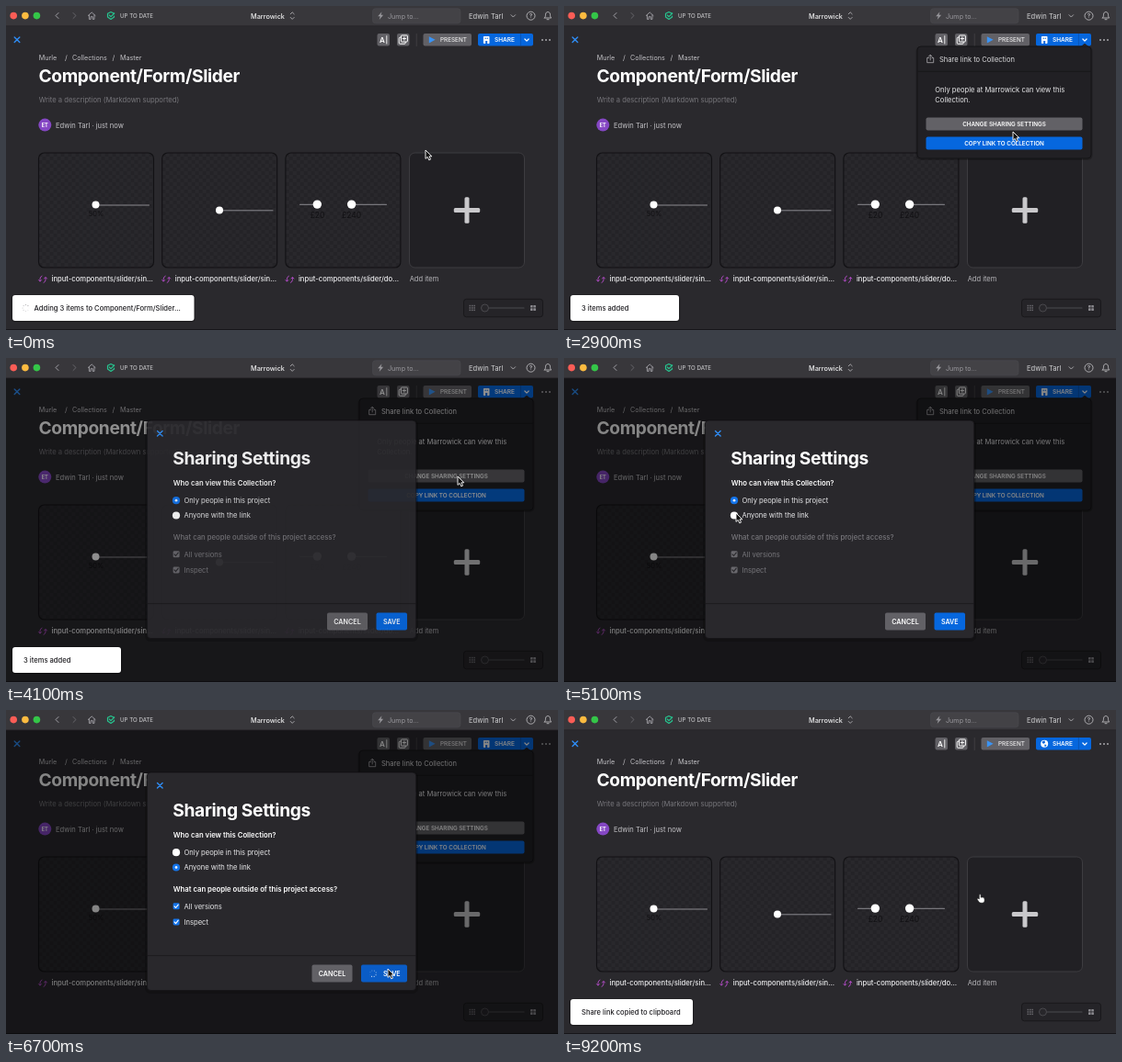
An HTML page for the animation above (9.3 s loop, 600 px wide and 353 px high).

```html
<!DOCTYPE html>
<html lang="en">
<head>
<meta charset="utf-8">
<title>Sharing a collection</title>
<style>
html, body { margin: 0; width: 100%; height: 100%; overflow: hidden; background: #2a292d; }
svg { display: block; width: 100vw; height: 100vh; }
text { font-family: Inter, Roboto, "Liberation Sans", sans-serif; white-space: pre; }
</style>
</head>
<body>
<svg id="stage" viewBox="0 0 600 353" xmlns="http://www.w3.org/2000/svg"></svg>
<script>
const LOOP = 9300;
const BLUE = '#0667de', PRESSED = '#0458cc', CONTROL = '#1474ea';
const GREY = '#626166', PALE = '#e8e8ea', PAGE = '#2a292d';
const user = 'Edwin Tarl', team = 'Marrowick', project = 'Murle';

// Drawing helpers; text is placed by the middle of its capitals.
const text = (x, y, s, size = 7.6, fill = PALE, weight = 400, extra = '') =>
  `<text x="${x}" y="${y + size * .36}" font-size="${size}" fill="${fill}" font-weight="${weight}" ${extra}>${s}</text>`;
const mid = (x, y, s, size, fill, weight) => text(x, y, s, size, fill, weight, 'text-anchor="middle"');
const rect = (x, y, w, h, fill, r = 2, extra = '') =>
  `<rect x="${x}" y="${y}" width="${w}" height="${h}" rx="${r}" fill="${fill}" ${extra}/>`;
const dot = (x, y, r, fill, extra = '') => `<circle cx="${x}" cy="${y}" r="${r}" fill="${fill}" ${extra}/>`;
const line = (d, stroke = PALE, w = 1) =>
  `<path d="${d}" fill="none" stroke="${stroke}" stroke-width="${w}" stroke-linecap="round" stroke-linejoin="round"/>`;
const shape = (d, fill) => `<path d="${d}" fill="${fill}"/>`;
const group = (id, body) => `<g id="${id}">${body}</g>`;
const move = (x, y, body) => `<g transform="translate(${x} ${y})">${body}</g>`;
const cross = (x, y) => line(`M${x - 2.8} ${y - 2.8}l5.6 5.6m0 -5.6l-5.6 5.6`, '#2f8df5', 1.4);
const tick = (x, y, color, w = 1) => line(`M${x - 2} ${y}l1.5 1.7l2.7 -3.4`, color, w);
const button = (x, y, w, h, fill, s, size = 6.3) =>
  rect(x, y, w, h, fill) + mid(x + w / 2, y + h / 2, s, size, '#fff', 600);

function titleBar() {
  return rect(0, 0, 600, 22, '#38373b', 0) + rect(0, 21.5, 600, .7, '#201f23', 0) +
    dot(8.2, 10.6, 3.8, '#fb5d56') + dot(20.9, 10.6, 3.8, '#fcbb40') + dot(33.4, 10.6, 3.8, '#34c648') +
    line('M57 7.5l-3 3l3 3', '#a3a2a7') + line('M73 7.5l3 3l-3 3', '#66656a') +
    line('M89.3 10.5l3.9 -3.6l3.9 3.6M90.4 9.8v4.6h1.7v-2.7h2.2v2.7h1.7v-4.6', '#a3a2a7', .9) +
    line('M117.5 8.2l-3.5 -1.7l-3.5 1.7v3.8l3.5 2.5l3.5 -2.5v-1', '#27c48f', 1.2) +
    line('M112.3 10l1.7 1.6l3.7 -3.6', '#27c48f', 1.2) +
    text(124, 10.9, 'UP TO DATE', 6.15, '#d8d8da') +
    mid(284.5, 11, team, 7.3, '#ededee', 500) +
    line('M309.2 8.8l2 -2l2 2M309.2 12.4l2 2l2 -2', '#b0afb3', .9) +
    rect(398.5, 2.8, 95.5, 16, '#434246', 3, 'stroke="#4b4a4f" stroke-width=".6"') +
    shape('M408.5 6.2l-4.3 5h2.5l-1 3.8l4.4 -5.2h-2.6z', '#98979c') +
    text(415, 11, 'Jump to...', 7.2, '#98979c') +
    text(503, 11, user, 7.6, '#d0d0d2') + line('M549 9.7l2.3 2.3l2.3 -2.3', '#b0afb3', .9) +
    dot(570.5, 10.7, 4.5, 'none', 'stroke="#b9b8bc" stroke-width=".9"') + mid(570.5, 10.8, '?', 6.4, '#c9c8cc', 500) +
    line('M585.3 13h7.4c-1.3 -1.2 -1.1 -2.4 -1.2 -3.8c-.2 -3.6 -4.8 -3.6 -5 0c-.1 1.4 .1 2.6 -1.2 3.8M588 14.7h2', '#b9b8bc', .9);
}

function toolBar() {
  return cross(12, 36.8) +
    rect(403.5, 30, 13.5, 13.5, GREY) + mid(408.8, 36.8, 'A', 8, '#fff', 600) + line('M413.8 32.6v8.4', '#fff', .9) +
    rect(425, 30, 13.5, 13.5, GREY) +
    rect(427.2, 34.2, 7, 7, 'none', 1, 'stroke="#fff"') + rect(429.4, 32, 7, 7, GREY, 1, 'stroke="#fff"') +
    line('M432.9 33.8v3.4M431.2 35.5h3.4', '#fff', .9) +
    rect(445.8, 30, .7, 14, '#48474b', 0) +
    rect(453.5, 30, 52.5, 13.5, GREY) + shape('M459.8 33.2l6.8 3.6l-6.8 3.6z', '#3a93f4') +
    text(472, 36.9, 'PRESENT', 6.35, '#eee', 500) +
    rect(513, 30, 60, 13.5, BLUE) + group('dropHot', rect(559.5, 30, 13.5, 13.5, '#084cab')) +
    rect(558.9, 30, .7, 13.5, '#0a4da6', 0) +
    text(531, 36.9, 'SHARE', 6.5, '#fff', 600) + line('M563.9 36l2.1 2.1l2.1 -2.1', '#fff', 1.2) +
    group('iconTeam', rect(518.9, 33, 6.6, 8, '#fff', .8) + rect(520.6, 34.6, 1.1, 1.3, BLUE, 0) +
      rect(522.7, 34.6, 1.1, 1.3, BLUE, 0) + rect(521.2, 38, 2, 3, BLUE, 0)) +
    group('iconGlobe', dot(522.2, 36.8, 4, '#fff') + shape('M520 34l2.6 -.4l.4 2l-1.6 1.2l-1.6 -.9zM522.4 37.6l2.2 .3l-1.3 2.1l-1 -.6z', BLUE)) +
    [583, 587, 591].map(x => dot(x, 36.9, 1, '#a8a7ab')).join('');
}

// Two upright arrows chasing each other
const sync = line('M-1 -3.6a3.4 3.4 0 0 0 -2 3v2.6M-4.5 .8l1.5 1.5l1.5 -1.5' +
  'M1 3.6a3.4 3.4 0 0 0 2 -3v-2.6M4.5 -.8l-1.5 -1.5l-1.5 1.5', '#b44cc8', .95);

function cards() {
  const labels = ['input-components/slider/sin...', 'input-components/slider/sin...', 'input-components/slider/do...'];
  const frames = labels.map((s, i) => move(35.5 + i * 134.2, 160,
    rect(0, 0, 125, 125, 'url(#checks)', 6, 'stroke="#121114" stroke-width="1.1"') +
    move(4.5, 137.8, sync) + text(14, 137.5, s, 7.65, '#ececee', 500))).join('');
  const rail = '#98979c', ink = '#111013';
  return frames +
    line('M97.5 217H155.5', rail, .9) + dot(97.5, 216.6, 4, '#fff') + mid(98, 226.5, '50%', 7.4, ink) +
    line('M232 222.8H290', rail, .9) + dot(232, 222.6, 4, '#fff') +
    line('M319.5 216.3H338M375.5 216.3H413.5', rail, .9) + dot(338.3, 216.1, 4.7, '#fff') + dot(375.6, 216.1, 4.7, '#fff') +
    mid(338.5, 227.5, '£20', 8.5, ink) + mid(375.6, 227.5, '£240', 8.5, ink) +
    rect(438.5, 160, 125, 125, '#212024', 6, 'stroke="#3d3c40"') +
    rect(498.5, 208.3, 5, 28.4, '#c9c8cb', 1.5) + rect(486.8, 220, 28.4, 5, '#c9c8cb', 1.5) +
    text(438.7, 297.5, 'Add item', 7.5, '#b9b8bc');
}

function zoomBar() {
  let s = rect(497.5, 319.3, 86, 19.5, '#252428', 3, 'stroke="#19181b"');
  for (let i = 0; i < 9; i++) s += rect(503.6 + i % 3 * 2.4, 325.8 + (i / 3 | 0) * 2.4, 1.5, 1.5, '#6b6a6f', 0);
  for (let i = 0; i < 4; i++) s += rect(570 + i % 2 * 3.3, 326 + (i >> 1) * 3.3, 2.6, 2.6, '#8b8a8f', .4);
  return s + line('M525.5 329H563', '#4b4a4f', 1.2) + dot(520.5, 329, 4, '#28272b', 'stroke="#4b4a4f"');
}

function page() {
  const crumb = '#c3c2c6';
  return rect(0, 0, 600, 353, PAGE, 0) + toolBar() +
    text(35.8, 56, project, 7.2, crumb) + text(64, 56, '/', 7.6, crumb) + text(72, 56, 'Collections', 7.2, crumb) +
    text(115.5, 56, '/', 7.6, crumb) + text(124, 56, 'Master', 7.2, crumb) +
    text(35.5, 75.9, 'Component/Form/Slider', 19.2, '#fff', 700, 'letter-spacing="-.4"') +
    text(35.8, 102.4, 'Write a description (Markdown supported)', 7.62, '#77767b') +
    dot(42.3, 129.6, 7, '#8547c4') + mid(42.3, 129.7, 'ET', 5.6, '#fff', 700) +
    text(54, 130, user + ' · just now', 7.6, '#c3c2c6') +
    cards() + zoomBar() + rect(0, 352, 600, 1, '#17161a', 0);
}

function popupFrame(h, gy, body) {
  return rect(382.5, 44, 192, h + 2, '#000', 5, 'opacity=".22"') +
    rect(384, 44, 189, h, '#212024', 4, 'stroke="#131216" stroke-width=".9"') +
    shape('M561.5 44.3l4.5 -3.6l4.5 3.6z', '#212024') + rect(384.5, 70.8, 188, .8, '#151417', 0) +
    line('M396.4 56.5h-1.7v5.2h7v-5.2h-1.7M398.2 59v-5.6M396.2 55.2l2 -2l2 2', '#a8a7ab', .85) +
    text(408, 58, 'Share link to Collection', 7.55, '#dcdcde') +
    button(393.5, gy, 170, 14, GREY, 'CHANGE SHARING SETTINGS') +
    button(393.5, gy + 21, 170, 14, BLUE, 'COPY LINK TO COLLECTION') + body;
}

function popups() {
  const row = (y, s) => text(403.3, y, s, 7.6);
  return group('menuTeam', popupFrame(122, 121.5,
      row(91.7, `Only people at ${team} can view this`) + row(102.6, 'Collection.'))) +
    group('menuLink', popupFrame(175, 174.2,
      row(91.5, 'Anyone with the link can view this') + row(102.3, 'Collection.') +
      row(117.7, 'Anyone outside of this project with the link') + row(128.2, 'can view:') +
      tick(408, 143.3, '#a8a7ab') + text(415, 143.3, 'All versions') +
      tick(408, 155.4, '#a8a7ab') + text(415, 155.4, 'Inspect') +
      group('copyHot', button(393.5, 195.2, 170, 14, PRESSED, 'COPY LINK TO COLLECTION'))));
}

function options(linked) {
  const tone = linked ? PALE : '#77767b', box = linked ? CONTROL : '#69686d';
  const radio = (y, on) => dot(185, y, 4.1, on ? CONTROL : '#fff') + (on ? dot(185, y, 1.4, '#e4effc') : '');
  const check = (y, s) => rect(181.6, y - 3.5, 7, 7, box, 1.4) + tick(185, y, linked ? '#fff' : '#29282c', 1.1) +
    text(193.5, y, s, 7.6, tone);
  return radio(155.2, !linked) + radio(171.5, linked) +
    text(181.7, 195.2, 'What can people outside of this project access?', 7.73, linked ? '#fff' : '#77767b', linked ? 600 : 500) +
    check(213.8, 'All versions') + check(230.9, 'Inspect');
}

const spinner = (id, x, y, color) => {
  let s = '';
  for (let i = 0; i < 8; i++) {
    const a = i * Math.PI / 4;
    s += dot(3.4 * Math.cos(a), 3.4 * Math.sin(a), .6, color, `opacity="${(i + 1) / 9}"`);
  }
  return move(x, y, group(id, s));
};

function modal() {
  const y = 277.6, h = 19;
  return rect(151, 67, 297, 242, '#000', 6, 'opacity=".2"') +
    rect(153.3, 68, 292.5, 237.5, '#29282c', 4, 'stroke="#151417" stroke-width=".8"') +
    rect(153.5, 267.3, 292, .8, '#19181b', 0) + cross(167.3, 82.3) +
    text(181.3, 109, 'Sharing Settings', 19.2, '#fff', 700, 'letter-spacing="-.35"') +
    text(181.7, 136, 'Who can view this Collection?', 7.73, '#fff', 600) +
    text(193.5, 155.2, 'Only people in this project') + text(193.5, 171.5, 'Anyone with the link') +
    group('optTeam', options(false)) + group('optLink', options(true)) +
    group('idle', button(349, y, 44, h, GREY, 'CANCEL', 7.2) + button(402.5, y, 33.5, h, BLUE, 'SAVE', 7.1)) +
    group('saving', button(332.5, y, 44, h, GREY, 'CANCEL', 7.2) + rect(386, y, 50, h, '#0a5cc6') +
      spinner('spinSave', 399, 287.2, '#fff') + text(410, 287.1, 'SAVE', 7.1, '#fff', 600));
}

const toast = (id, w, x, s) => group(id,
  rect(5.8, 314.6, w + 2.4, 30, '#000', 4, 'opacity=".25"') + rect(7, 315, w, 28, '#fff', 3) +
  text(x, 329, s, 7.6, '#1e1d21', 500) + (id === 'adding' ? spinner('spinAdd', 21.5, 329, '#98979c') : ''));

const arrow = '<path d="M0 0V9.4L2.2 7.4L3.8 10.9L5.5 10.1L4 6.8H6.9Z" fill="#111" stroke="#fff" stroke-width=".9" stroke-linejoin="round"/>';
const hand = '<path d="M-1.2 .8C-1.2 -.6 .6 -.6 .6 .8V3.2C2.6 2.9 4.6 3.3 4.6 5V6.5C4.6 8.2 3.6 9.3 1.6 9.3C-.5 9.3 -1.2 8.6 -2.2 7.1L-3.4 5.2C-3.5 4 -2.3 3.9 -1.2 5Z" fill="#fff" stroke="#222" stroke-width=".6" stroke-linejoin="round"/>';

const stage = document.getElementById('stage');
stage.innerHTML = `<defs><pattern id="checks" width="8" height="8" patternUnits="userSpaceOnUse">
  <rect width="8" height="8" fill="#29282c"/><path d="M0 0h4v8h4v-4H0z" fill="#242327"/></pattern></defs>` +
  page() + popups() + group('dim', rect(0, 22, 600, 331, '#000', 0)) + group('modal', modal()) + titleBar() +
  toast('adding', 197.5, 30.5, 'Adding 3 items to Component/Form/Slider...') +
  toast('added', 118, 19, '3 items added') +
  toast('copied', 133, 19, 'Share link copied to clipboard') +
  group('cursor', group('arrow', arrow) + group('hand', hand));

const el = {};
stage.querySelectorAll('g[id]').forEach(g => el[g.id] = g);

// time, x, y of the pointer tip
const path = [
  [0, 456, 157], [500, 456, 157], [1500, 568, 40], [1950, 568, 40], [2800, 488, 137], [3050, 488, 137],
  [3500, 491, 129], [4250, 491, 129], [4950, 187, 169], [5300, 187, 169], [6000, 415, 282],
  [6850, 415, 282], [7550, 452.5, 201], [LOOP, 452.5, 201]
];
// time, opacity
const fades = {
  adding: [[0, 1], [750, 1], [850, 0]],
  added: [[750, 0], [850, 1], [4500, 1], [4800, 0]],
  copied: [[8350, 0], [8700, 1]],
  modal: [[3880, 0], [4120, 1], [6800, 1], [7050, 0]],
  dim: [[3880, 0], [4120, .48], [6800, .48], [7050, 0]],
  menuTeam: [[1850, 0], [2000, 1], [6799, 1], [6800, 0]],
  menuLink: [[6799, 0], [6800, 1], [8200, 1], [8350, 0]]
};
// spans of time in which a part is shown
const spans = {
  dropHot: [1400, 2050], iconTeam: [0, 6800], iconGlobe: [6800, LOOP], copyHot: [7450, 8350],
  optTeam: [0, 5150], optLink: [5150, LOOP], idle: [0, 6150], saving: [6150, LOOP],
  arrow: [0, 8300], hand: [8300, LOOP]
};

function sample(keys, t, ease = k => k) {
  if (t <= keys[0][0]) return keys[0].slice(1);
  const i = keys.findIndex(k => k[0] > t);
  if (i < 0) return keys[keys.length - 1].slice(1);
  const a = keys[i - 1], b = keys[i], k = ease((t - a[0]) / (b[0] - a[0]));
  return a.slice(1).map((v, n) => v + (b[n + 1] - v) * k);
}
const smooth = k => k * k * (3 - 2 * k);

function render(t) {
  for (const id in fades) {
    const o = sample(fades[id], t)[0];
    el[id].style.display = o > 0 ? '' : 'none';
    el[id].style.opacity = o;
  }
  for (const id in spans) el[id].style.display = t >= spans[id][0] && t < spans[id][1] ? '' : 'none';
  const [x, y] = sample(path, t, smooth);
  el.cursor.setAttribute('transform', `translate(${x.toFixed(2)} ${y.toFixed(2)})`);
  for (const id of ['spinAdd', 'spinSave']) el[id].setAttribute('transform', `rotate(${t * .4 % 360})`);
}

const start = performance.now();
function loop() {
  render((performance.now() - start) % LOOP);
  requestAnimationFrame(loop);
}
loop();
</script>
</body>
</html>
```
